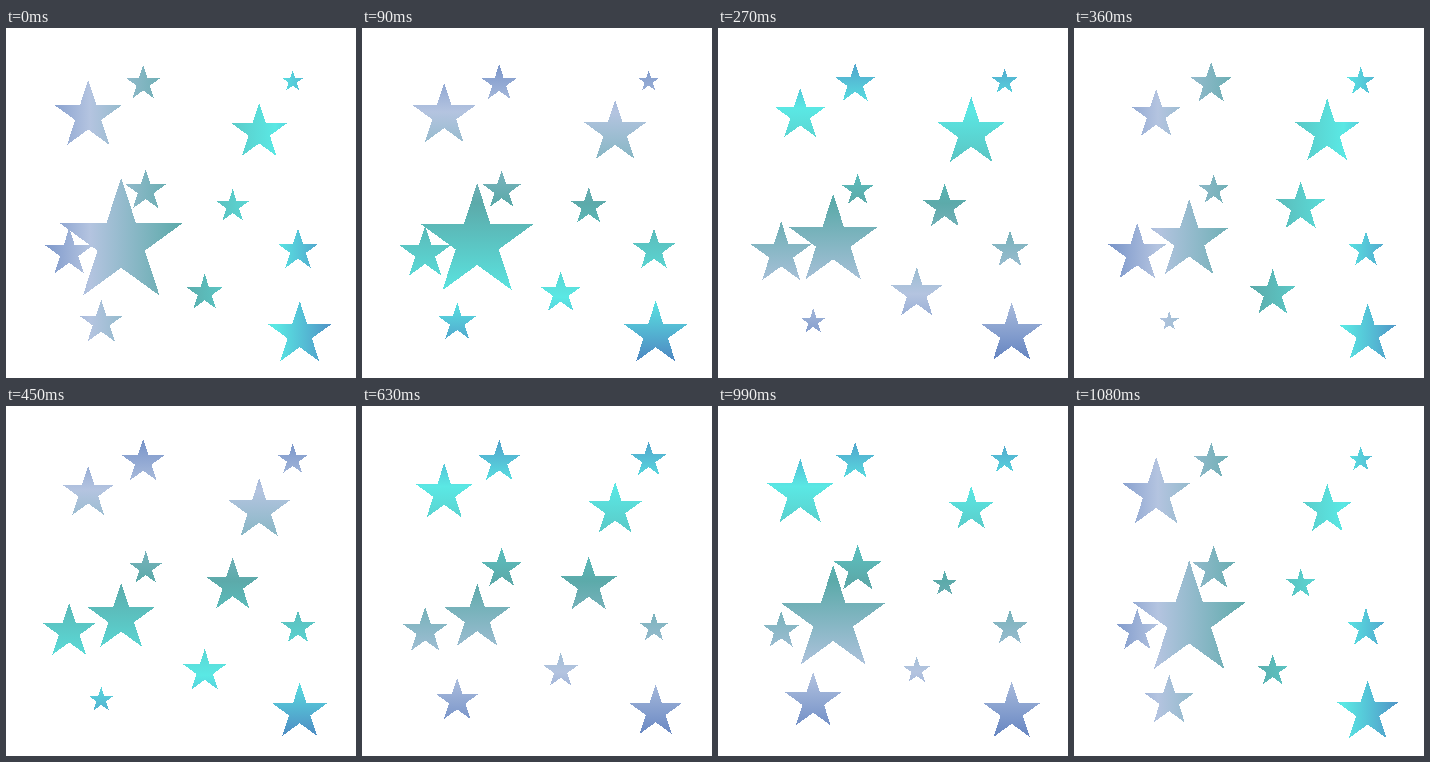
An HTML page for the animation above (1.17 s loop, 350 px wide and 350 px high).

```html
<!DOCTYPE html>
<html lang="en">
<head>
<meta charset="utf-8">
<title>Twinkling stars</title>
<style>
  html, body { margin: 0; width: 100%; height: 100%; overflow: hidden; background: #fff; }
  svg { display: block; width: 100vw; height: 100vh; }
</style>
</head>
<body>
<svg viewBox="0 0 350 350">
  <defs>
    <linearGradient id="sheen" gradientUnits="userSpaceOnUse" x1="0" y1="0" x2="350" y2="0">
      <stop offset="0" stop-color="#4f73b9"/>
      <stop offset=".24" stop-color="#b4c4e0"/>
      <stop offset=".5" stop-color="#5caaaa"/>
      <stop offset=".77" stop-color="#5ae8e4"/>
      <stop offset="1" stop-color="#4b6eb9"/>
    </linearGradient>
  </defs>
  <path id="stars" fill="url(#sheen)" shape-rendering="crispEdges"/>
</svg>
<script>
const STEPS = 13, STEP_MS = 90;
const sheen = document.getElementById('sheen');
const path = document.getElementById('stars');

const star = (x, y, min, max, trough, peak) => ({ x, y, min, max, trough, peak });

// Box centre, smallest and largest width, and the steps at which they occur.
const stars = [
  star(115.2, 208.7, 56, 124, 6, 0),
  star(82.2, 84.4, 48.5, 71, 3.6, 12.5),
  star(137.2, 53.7, 35, 44.5, 0, 5.5),
  star(286.7, 52.3, 20, 37.5, 0.5, 8),
  star(253.2, 101.3, 40, 71, 10.3, 2.5),
  star(139.7, 160.7, 29, 51, 3.8, 10),
  star(226.7, 176.7, 25, 60, 11, 6.5),
  star(292, 220.2, 27, 43, 8, 0.5),
  star(63.2, 222.8, 34, 62, 10.2, 3),
  star(198.7, 263.2, 22, 51, 10, 3),
  star(95.2, 292.5, 18, 66, 4.2, 9.5),
  star(293.7, 303.2, 50, 65, 8, 0.5)
];

const stepsBetween = (from, to) => (to - from + STEPS) % STEPS;

// Grows linearly from trough to peak, then shrinks linearly back.
function widthAt({ min, max, trough, peak }, step) {
  const rise = stepsBetween(trough, peak);
  const age = stepsBetween(trough, step);
  const level = age < rise ? age / rise : (STEPS - age) / (STEPS - rise);
  return min + (max - min) * level;
}

function starPath({ x, y }, width) {
  const radius = width / (2 * Math.sin(Math.PI * 0.4));
  const centreY = y + radius * (1 - Math.cos(Math.PI / 5)) / 2;
  const points = Array.from({ length: 10 }, (_, i) => {
    const r = i % 2 ? radius * 0.382 : radius;
    const angle = i * Math.PI / 5;
    return `${(x + r * Math.sin(angle)).toFixed(2)},${(centreY - r * Math.cos(angle)).toFixed(2)}`;
  });
  return `M${points.join('L')}Z`;
}

let shown = -1;

function draw(ms) {
  const step = Math.floor(ms / STEP_MS) % STEPS;
  if (step === shown) return;
  shown = step;
  sheen.setAttribute('gradientTransform', `rotate(${step * 90} 175 175)`);
  path.setAttribute('d', stars.map(s => starPath(s, widthAt(s, step))).join(''));
}

let start;
function tick(now) {
  start ??= now;
  draw(now - start);
  requestAnimationFrame(tick);
}
draw(0);
requestAnimationFrame(tick);
</script>
</body>
</html>
```
